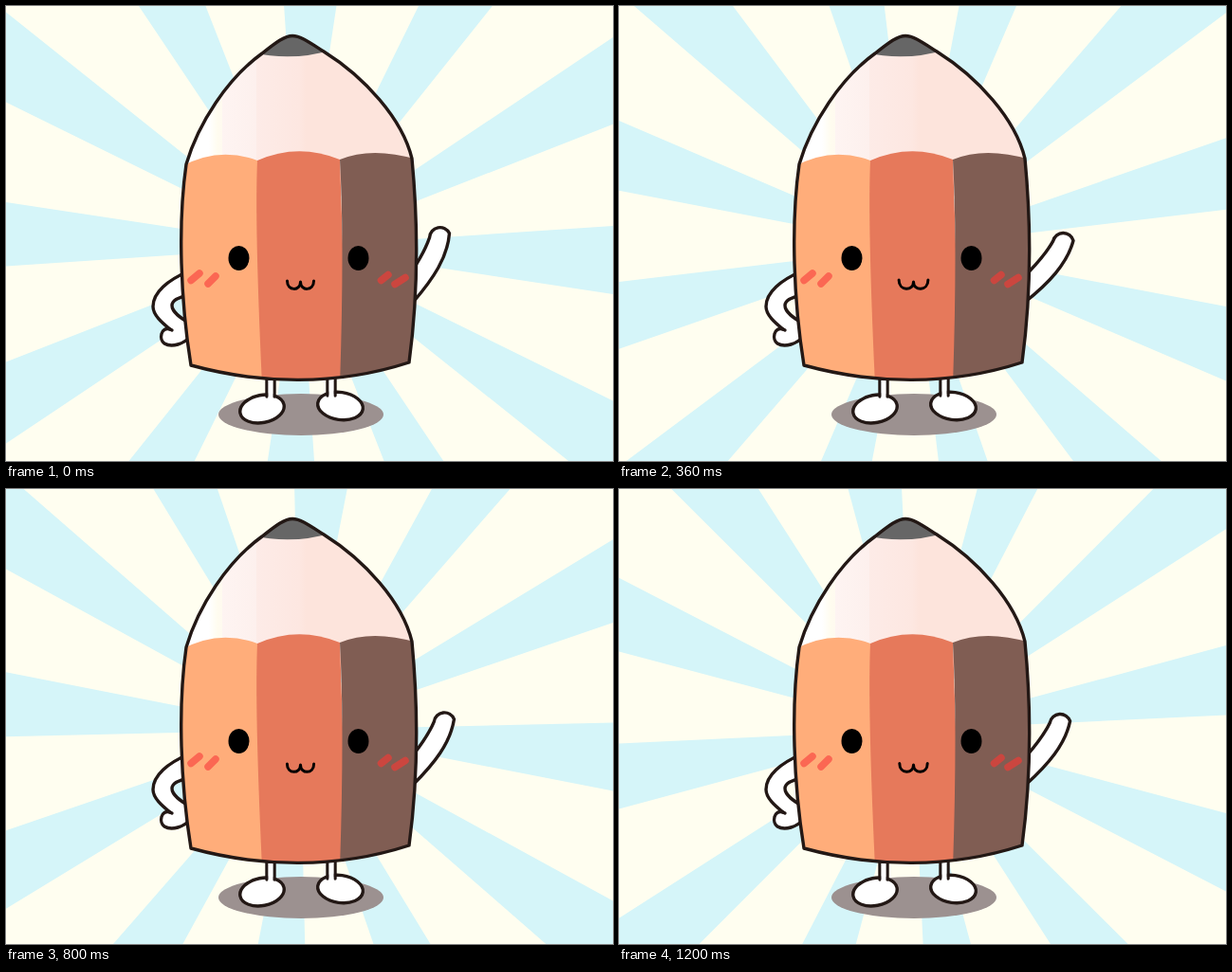
An HTML page that plays this animation: 640x480 px, repeating every 1240 ms.

```html
<!DOCTYPE html>
<html lang="en">
<head>
<meta charset="utf-8">
<title>Waving pencil</title>
<style>
  html, body { margin: 0; width: 100%; height: 100%; overflow: hidden; background: #fffef0; }
  svg { display: block; width: 640px; height: 480px; }
  .ink { stroke: #231815; stroke-width: 3.4; stroke-linejoin: round; stroke-linecap: round; }
  .white { fill: #fff; }
  .cheek { stroke-width: 7.5; stroke-linecap: round; fill: none; }
</style>
</head>
<body>
<svg viewBox="0 0 640 480">
  <defs>
    <clipPath id="inside"><use href="#outline"/></clipPath>
    <linearGradient id="wood" gradientUnits="userSpaceOnUse" x1="190" x2="428" y1="0" y2="0">
      <stop offset=".1" stop-color="#fff"/>
      <stop offset=".14" stop-color="#fffcef"/>
      <stop offset=".16" stop-color="#fffaf0"/>
      <stop offset=".16" stop-color="#fef4f2"/>
      <stop offset=".31" stop-color="#fdf0ed"/>
      <stop offset=".31" stop-color="#fdebe7"/>
      <stop offset=".5" stop-color="#fde7e1"/>
      <stop offset=".53" stop-color="#fde4dc"/>
    </linearGradient>
  </defs>

  <path id="rays" fill="#d5f5f9"/>
  <ellipse cx="311" cy="431" rx="87" ry="22" fill="#9c9190"/>

  <g class="ink white">
    <ellipse cx="270" cy="425" rx="23.5" ry="14.5" transform="rotate(-11 270 425)"/>
    <ellipse cx="352.500" cy="422" rx="24" ry="14.500" transform="rotate(8 352.500 422)"/>
    <path d="M275 385V412M283 385V412M339 385V411M347 385V411" />
    <path stroke="none" d="M276.500 385h5v30h-5zM340.500 385h5v30h-5z"/>
    <path d="M192 280C171 289 155 302 155 317C155 327 167 336 173 341C163 338 161 352 167 356C175 361 188 356 194 349V335C184 329 175 323 175 316C175 311 182 307 194 305"/>
    <path fill="none" d="M171 340L175 342"/>
    <path id="arm"/>
  </g>

  <g clip-path="url(#inside)">
    <path fill="url(#wood)" d="M180 20H440V200H180Z"/>
    <path fill="#666" d="M260 20H345V46Q302 59 260 49Z"/>
    <path fill="#ffad7a" d="M180 172Q222 147 265 163L275 400H180Z"/>
    <path fill="#e6795b" d="M265 163Q308 144 352 162L360 400H270Q262 230 265 163Z"/>
    <path fill="#805d53" d="M352 162Q388 147 440 164V400H352Q357 250 352 162Z"/>
  </g>
  <path id="outline" class="ink" fill="none" d="M190 167C203 123 234 76 270 50C283 40 293 31.500 302 31.500C311 31.500 321 39 335 48C378 75 418 119 428 161C435 235 435 302 425 376C348 401 268 399 195 379C184 311 181 230 190 167Z"/>

  <ellipse cx="245.500" cy="266" rx="11" ry="13"/>
  <ellipse cx="371.500" cy="266" rx="11" ry="13"/>
  <path class="cheek" stroke="#fb6753" d="M195 289.500L204 282M213 293L221 285"/>
  <path class="cheek" stroke="#cb463f" d="M395.500 289.500L403 283.500M410 293.500L421 286.500"/>
  <path id="mouth" fill="none" stroke="#000" stroke-width="3" stroke-linecap="round" stroke-linejoin="round"/>
</svg>
<script>
const LOOP = 1240, STEP = 40, WAVES = 3, RAYS = 12;
const CENTER = [310, 254];
const [rays, arm, mouth] = ['rays', 'arm', 'mouth'].map(id => document.getElementById(id));

function rayPoint(degrees) {
  const a = degrees * Math.PI / 180;
  return `${CENTER[0] + 600 * Math.cos(a)} ${CENTER[1] + 600 * Math.sin(a)}`;
}

rays.setAttribute('d', Array.from({ length: RAYS }, (_, i) => {
  const middle = 2.4 + i * 360 / RAYS;
  return `M${CENTER}L${rayPoint(middle - 6.2)}L${rayPoint(middle + 6.2)}Z`;
}).join(''));

// 0 = arm raised, 1 = arm lowered
function wave(t) {
  const phase = (t / LOOP * WAVES + 0.985) % 1;
  const linear = 1 - Math.abs(1 - 2 * phase);
  const smooth = (1 - Math.cos(2 * Math.PI * phase)) / 2;
  return (linear + smooth) / 2;
}

function draw(t) {
  rays.setAttribute('transform', `rotate(${t * 0.0406} ${CENTER})`);

  const drop = wave(t), reach = 66 + 6 * drop;
  arm.setAttribute('transform', `translate(425 302) rotate(${47 * drop - 61})`);
  arm.setAttribute('d', `M-6 -9C20 -10 ${reach - 29} -5 ${reach - 5} -10` +
    `A11 11 0 0 1 ${reach + 9} 6C${reach - 14} 17 25 15 -6 9`);

  const open = Math.min(1, Math.max(0, drop - 0.1) * 4), w = 14 + 2.5 * open, top = 290 - 2 * open;
  mouth.setAttribute('d', `M${310.5 - w} ${top}C${310.5 - w} 301 310.500 301 310.500 291` +
    `C310.500 301 ${310.5 + w} 301 ${310.5 + w} ${top}`);
}

function tick() {
  draw(Math.floor(performance.now() % LOOP / STEP) * STEP);
  requestAnimationFrame(tick);
}
tick();
</script>
</body>
</html>
```
